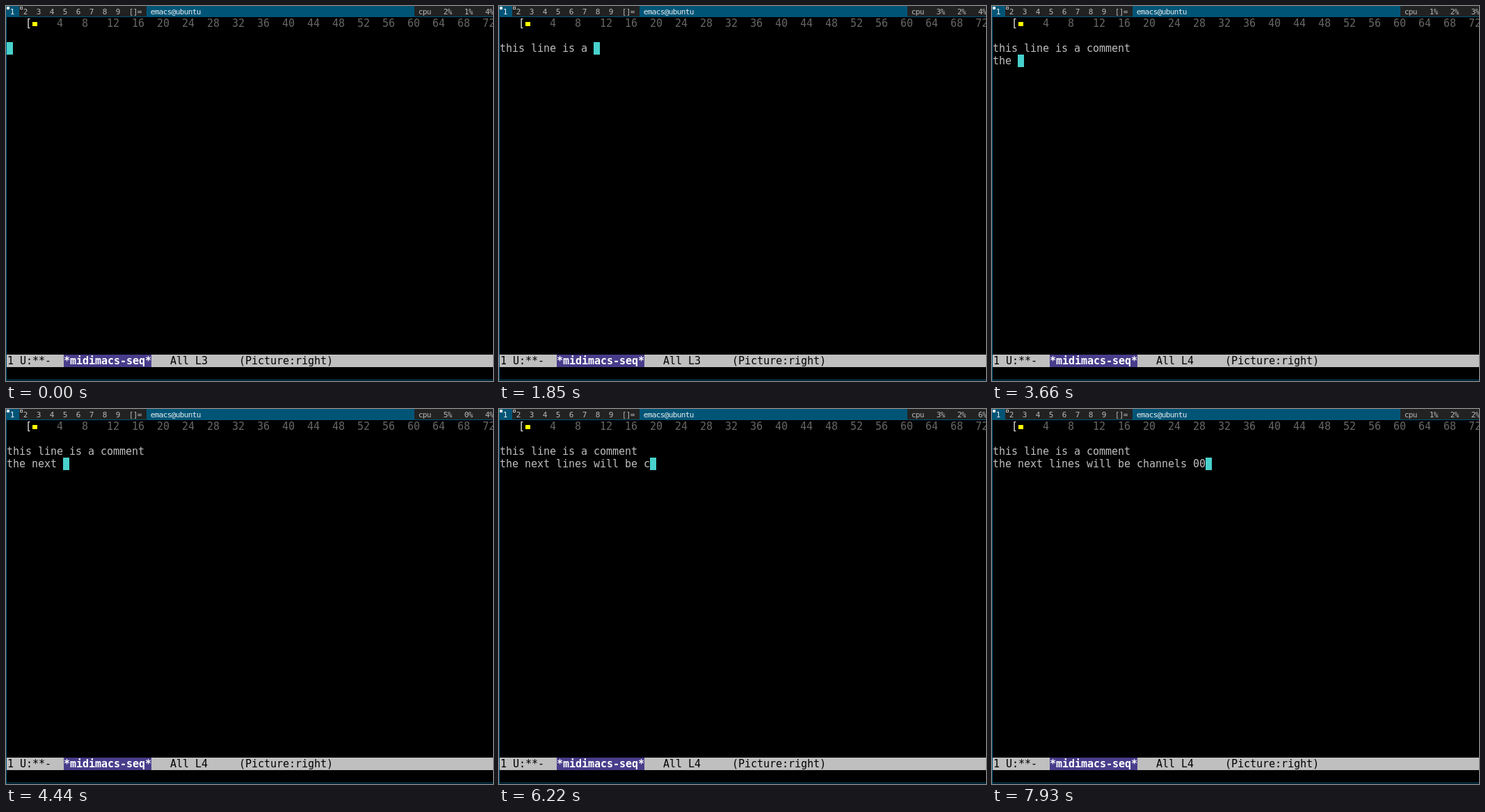
These frames come from a looping animation (700 px wide and 540 px high, 8 s). An HTML page with a canvas:

```html
<!DOCTYPE html>
<html lang="en">
<head>
<meta charset="utf-8">
<title>Typing in a text editor</title>
<style>
  html, body { margin: 0; width: 100%; height: 100%; overflow: hidden; background: #000; }
  canvas { display: block; }
</style>
</head>
<body>
<canvas id="stage" width="700" height="540"></canvas>
<script>
const ctx = document.getElementById('stage').getContext('2d');
const LOOP = 8000;
const CELL = 9, ROW = 18, LEFT = 1, TOP = 16;
const FONT = '"DejaVu Sans Mono", monospace';
const BLUE = '#005577', BAR = '#222222', BAR_TEXT = '#bbbbbb', BRIGHT = '#eeeeee';

// [first key ms, last key ms, keys]; "<" is backspace
const typing = [
  [500, 1130, 'this line'], [1270, 1270, ' '], [1500, 1850, 'is a '],
  [1990, 2120, 'com'], [2260, 2340, 'me'], [2500, 2540, 'nt'], [3020, 3020, '\n'],
  [3340, 3660, 'te<he '], [3870, 3990, 'net'], [4160, 4440, ' <<xt '],
  [4770, 5140, 'lines '], [5340, 6090, 'wii<ll be '], [6220, 6220, 'c'],
  [6410, 6410, 'h'], [6620, 6620, 'a'], [6780, 7120, 'nnel'],
  [7380, 7380, 's'], [7580, 7580, ' '], [7800, 7930, '00'],
];
const keys = typing.flatMap(([start, end, text]) =>
  [...text].map((key, i) => ({
    key, at: start + (end - start) * i / Math.max(1, text.length - 1),
  })));

// [ms, load of each core]
const cpuLoads = [
  [0, '214'], [60, '312'], [1030, '324'], [2010, '222'], [2980, '123'],
  [3950, '504'], [4926, '322'], [5900, '326'], [6873, '224'], [7846, '122'],
];

function rect(x, y, w, h, color) {
  ctx.fillStyle = color;
  ctx.fillRect(x, y, w, h);
}

function cells(text, x, baseline, color, step, font) {
  ctx.font = `${font} ${FONT}`;
  ctx.fillStyle = color;
  ctx.textAlign = 'center';
  [...text].forEach((char, i) => ctx.fillText(char, x + (i + 0.5) * step, baseline));
}

const editorText = (text, x, row, color, weight = '') =>
  cells(text, x, TOP + row * ROW + 14, color, CELL, `${weight} 15px`);
const barText = (text, x, color) => cells(text, x, 12, color, 6, '11px');

function typedText(time) {
  let text = '';
  for (const { key, at } of keys) {
    if (at > time) break;
    text = key === '<' ? text.slice(0, -1) : text + key;
  }
  return text;
}

function drawBar(time) {
  rect(0, 0, 700, 15, BAR);
  rect(0, 0, 19, 15, BLUE);
  rect(202, 0, 385, 15, BLUE);
  for (let tag = 0; tag < 9; tag++) {
    barText(String(tag + 1), 6 + tag * 19, tag ? BAR_TEXT : BRIGHT);
  }
  rect(1, 1, 4, 4, BRIGHT);
  ctx.strokeStyle = BAR_TEXT;
  ctx.lineWidth = 1;
  ctx.strokeRect(20.5, 1.5, 3, 3);
  barText('[]=', 177, BAR_TEXT);
  barText('emacs@ubuntu', 208, BRIGHT);
  const [, loads] = cpuLoads.findLast(([at]) => at <= time);
  barText('cpu' + [...loads].map(load => `   ${load}%`).join(''), 593, BAR_TEXT);
}

function drawFrame() {
  rect(0, 15, 700, 1, BLUE);
  rect(0, 15, 1, 525, BLUE);
  rect(0, 538, 700, 1, BLUE);
}

function drawRuler() {
  editorText('[', LEFT + 3 * CELL, 0, '#e5e5e5');
  rect(38, 23, 7, 6, '#ffff00');
  for (let beat = 4; beat <= 72; beat += 4) {
    editorText(String(beat), LEFT + (4 + beat) * CELL, 0, '#666666');
  }
}

function drawBuffer(lines) {
  lines.forEach((line, i) => editorText(line, LEFT, 2 + i, '#bebebe'));
  const row = lines.length + 1;
  rect(LEFT + lines.at(-1).length * CELL, TOP + row * ROW, CELL, ROW, '#48d1cc');
}

function drawModeLine(lineNumber) {
  const x = LEFT + 1, row = 27, y = TOP + row * ROW;
  rect(LEFT, y, 699, ROW, '#bfbfbf');
  rect(x + 9 * CELL, y, 14 * CELL, ROW, '#483d8b');
  editorText('1 U:**-', x, row, '#000000');
  editorText('*midimacs-seq*', x + 9 * CELL, row, '#ffffff', 'bold');
  editorText(`All L${lineNumber}     (Picture:right)`, x + 26 * CELL, row, '#000000');
}

function draw(now) {
  const time = now % LOOP;
  const lines = typedText(time).split('\n');
  rect(0, 0, 700, 540, '#000000');
  drawBar(time);
  drawFrame();
  drawRuler();
  drawBuffer(lines);
  drawModeLine(lines.length + 2);
}

const startTime = performance.now();
function tick() {
  draw(performance.now() - startTime);
  requestAnimationFrame(tick);
}
tick();
</script>
</body>
</html>
```
